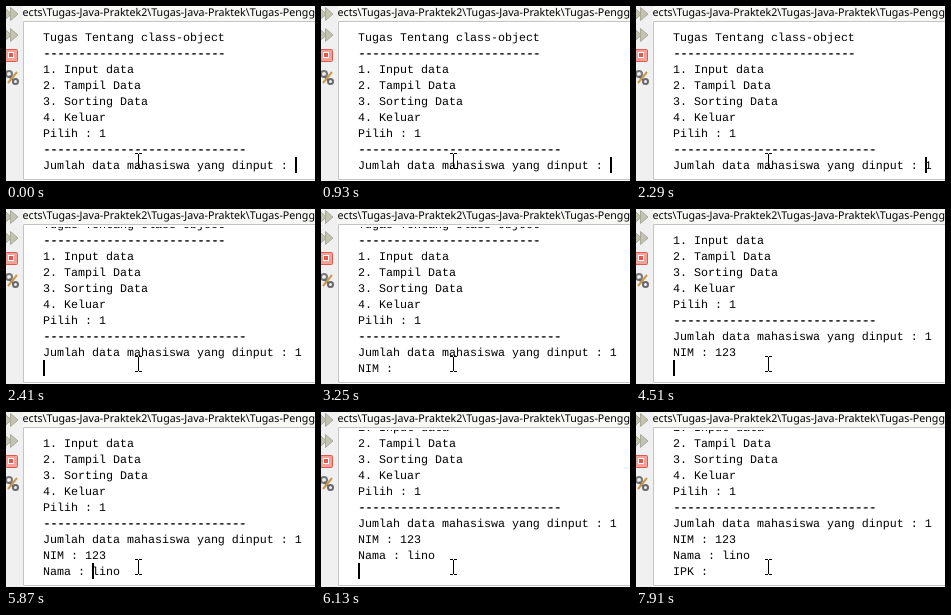
Recreate the animation shown at these times as an HTML page. Size 309 px wide and 175 px high, loop 8 s.

```html
<!DOCTYPE html>
<html lang="id">
<head>
<meta charset="utf-8">
<title>Console</title>
<style>
  html, body { margin: 0; width: 100%; height: 100%; overflow: hidden; background: #fff; }
  svg { display: block; }
  text { white-space: pre; text-rendering: geometricPrecision; fill: #000; }
  .path { font: 10.67px "Noto Sans", "Open Sans", sans-serif; }
  #rows text { font: 11.667px "Liberation Mono", monospace; }
  #rows .rule { filter: drop-shadow(1px 0 0 #000); }
</style>
</head>
<body>
<svg width="309" height="175" viewBox="0 0 309 175">
  <defs>
    <clipPath id="view"><rect x="18" y="18" width="291" height="155"/></clipPath>
    <g id="run" fill="#c3c3b2" stroke="#a9a99a">
      <path d="M-2 -6.5L5.5 0L-2 6.5Z"/>
      <path d="M4.5 -6.5L12 0L4.5 6.5Z"/>
    </g>
  </defs>
  <rect width="309" height="175" fill="#fff"/>
  <rect width="309" height="15" fill="#f8f8f4"/>
  <rect width="17" height="175" fill="#f0f0f0"/>
  <path d="M309 15.5H17.5V173.5H309" fill="none" stroke="#c4c4c8"/>
  <text class="path" x="16.5" y="10">ects\Tugas-Java-Praktek2\Tugas-Java-Praktek\Tugas-Pengg</text>

  <use href="#run" x="0" y="8"/>
  <use href="#run" x="0" y="29"/>
  <rect x="-1.5" y="43.5" width="13" height="12" rx="1" fill="#f3a29a" stroke="#dc5a50"/>
  <rect x="2.5" y="46.5" width="5" height="5" fill="#e2584c" stroke="#fff"/>
  <g fill="none">
    <circle cx="3" cy="68" r="3" stroke="#77777a" stroke-width="2"/>
    <path d="M3 70L7 74" stroke="#68686c" stroke-width="2.4"/>
    <path d="M11 66L2 77" stroke="#c99a4b" stroke-width="2"/>
    <circle cx="9.5" cy="75.5" r="2.5" stroke="#68686c" stroke-width="2"/>
  </g>

  <g clip-path="url(#view)"><g id="rows"></g></g>
  <rect id="caret" y="151" width="2" height="16"/>
  <path d="M129 147.5H132M133 147.5H136M132.5 148V162M129 162.5H132M133 162.5H136" fill="none" stroke="#000"/>
</svg>
<script>
const LOOP = 8000, LEFT = 37, CELL = 7, LINE = 16, BASE = 35, ROWS = 9;
const intro = [
  "Tugas Tentang class-object",
  "-".repeat(26),
  "1. Input data",
  "2. Tampil Data",
  "3. Sorting Data",
  "4. Keluar",
  "Pilih : 1",
  "-".repeat(29),
  "Jumlah data mahasiswa yang dinput : "
].join("\n");

// time, text added to the console, caret column (-1 = hidden)
const steps = [
  [0, "", 36], [550, "", -1], [930, "", 36],
  [1510, "1", 37], [2020, "", -1], [2290, "", 36],
  [2410, "\n", 0], [2700, "NIM : ", 6], [3250, "", -1],
  [3680, "1", 7], [3830, "2", 8], [4110, "3", 9], [4240, "", 6],
  [4510, "\n", 0], [4760, "Nama : ", 7],
  [5190, "l", 8], [5310, "i", 9], [5590, "no", 11], [5870, "", 7],
  [6130, "\n", 0], [6400, "IPK : ", 6],
  [6920, "", -1], [7350, "", 6], [7910, "", -1]
];

const rows = document.getElementById("rows");
const caret = document.getElementById("caret");
let shown = -1;

function show(n) {
  const added = steps.slice(0, n + 1).map(s => s[1]).join("");
  const lines = (intro + added).split("\n");
  const scroll = lines.length - ROWS;
  rows.replaceChildren(...lines.map((line, i) => {
    const el = document.createElementNS("http://www.w3.org/2000/svg", "text");
    el.setAttribute("x", LEFT);
    el.setAttribute("y", BASE + (i - scroll) * LINE);
    if (line.startsWith("--")) el.setAttribute("class", "rule");
    el.textContent = line;
    return el;
  }));
  const col = steps[n][2];
  caret.setAttribute("x", LEFT + col * CELL);
  caret.setAttribute("visibility", col < 0 ? "hidden" : "visible");
}

const start = performance.now();
function tick() {
  const t = (performance.now() - start) % LOOP;
  const n = steps.findLastIndex(s => s[0] <= t);
  if (n !== shown) show(shown = n);
  requestAnimationFrame(tick);
}
tick();
</script>
</body>
</html>
```
